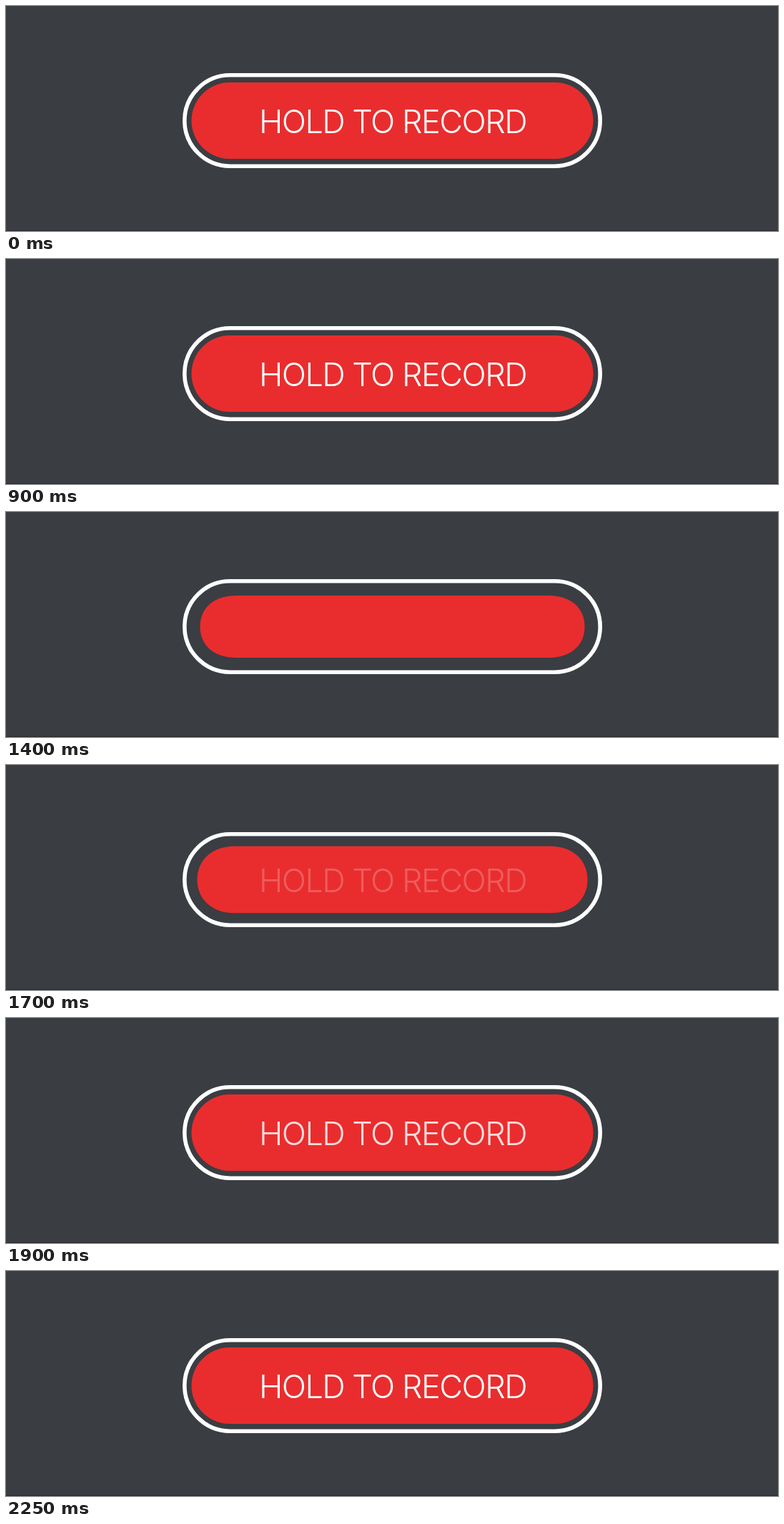
Write an HTML page that moves like this. It is 1080x315 px and loops after 2.3 s.

```html
<!DOCTYPE html>
<html lang="en">
<head>
<meta charset="utf-8">
<title>Hold to record</title>
<style>
  html, body { margin: 0; width: 100%; height: 100%; overflow: hidden; background: #3a3d42; }
  svg { display: block; width: 100%; height: 100%; }
  text { font: 300 45px Inter, sans-serif; letter-spacing: -1.5px; fill: #fff; text-anchor: middle; }
</style>
</head>
<body>
<svg viewBox="0 0 1080 315">
  <rect y="314" width="1080" height="1" fill="#2b272b"/>
  <rect x="249.8" y="96.8" width="581.4" height="127.4" rx="63.7" fill="none" stroke="#fff" stroke-width="5.6"/>
  <path id="button" fill="#e92d2e"/>
  <text id="label" x="541" y="177.5">HOLD TO RECORD</text>
</svg>
<script>
const LOOP = 2300, STEP = 50;
const PRESS = 900, RELEASE = 1650;
const button = document.getElementById('button');
const label = document.getElementById('label');
const clamp = v => Math.min(1, Math.max(0, v));

// Pill centred on the stage; s = 0 at rest, 1 when pressed.
function pill(s) {
  const cx = 540.5, cy = 160.5;
  const w = 281 - 12 * s, h = 53.5 - 10 * s, r = 53.5 - 2.5 * s;
  const k = 0.552 + 0.06 * s;
  const l = cx - w, R = cx + w, t = cy - h, b = cy + h;
  const dx = r * (1 - k), dy = h * (1 - k);
  return `M${l + r} ${t}H${R - r}C${R - dx} ${t} ${R} ${t + dy} ${R} ${cy}` +
    `S${R - dx} ${b} ${R - r} ${b}H${l + r}C${l + dx} ${b} ${l} ${b - dy} ${l} ${cy}` +
    `S${l + dx} ${t} ${l + r} ${t}Z`;
}

function draw(now) {
  const t = Math.floor(now % LOOP / STEP) * STEP;
  const press = clamp((t - PRESS) / 100);
  const release = clamp((t - RELEASE) / 150);
  const fade = clamp((t - RELEASE) / 420);
  button.setAttribute('d', pill(press - release));
  label.setAttribute('opacity', t <= PRESS ? 1 : 1 - (1 - fade) ** 2);
  requestAnimationFrame(draw);
}
draw(performance.now());
</script>
</body>
</html>
```
